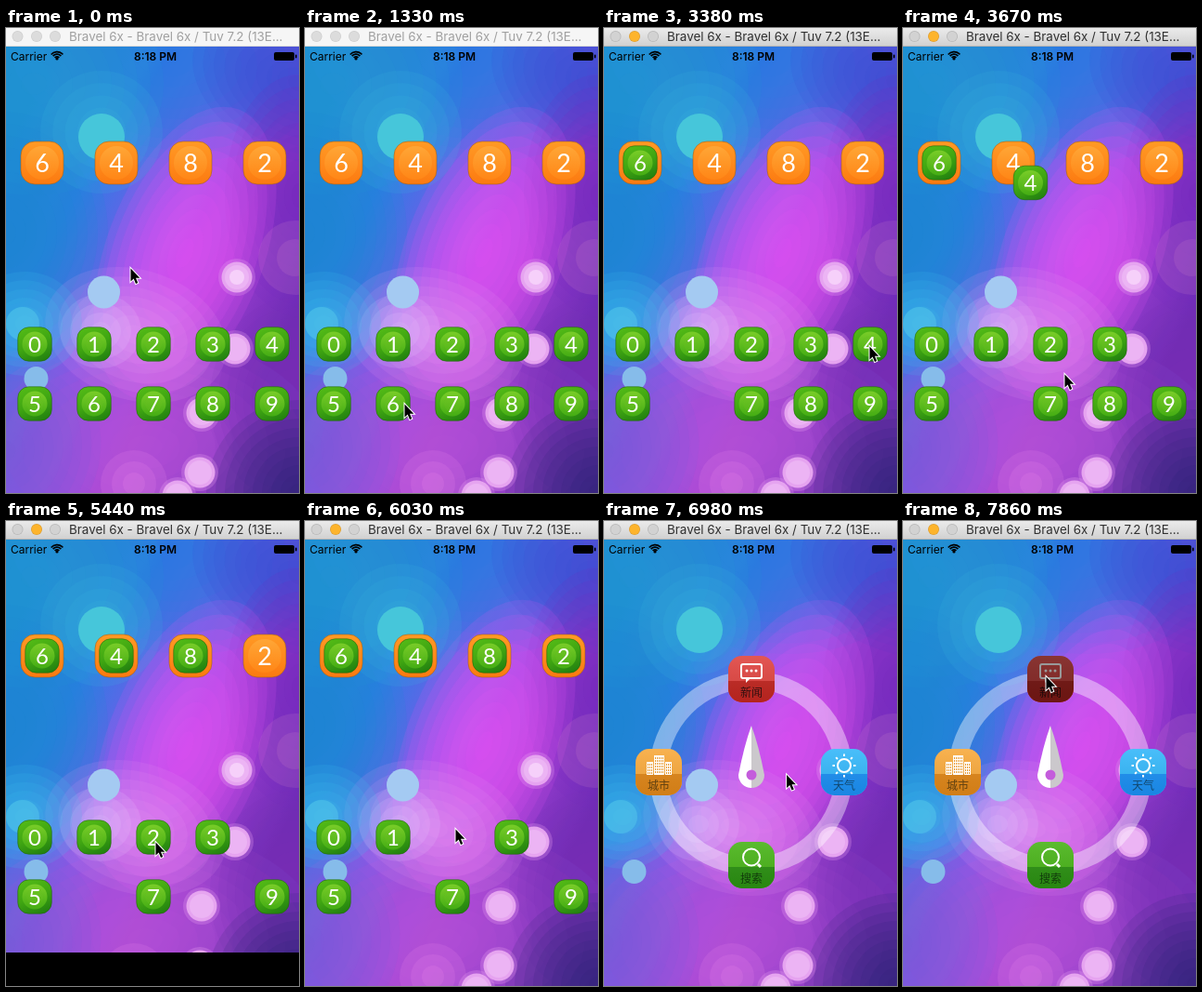
Write an HTML page with a canvas that moves like this. It is 316 by 500 pixels and loops after 8000 ms.

```html
<!DOCTYPE html>
<html lang="en">
<head>
<meta charset="utf-8">
<title>Number puzzle</title>
<style>
  html, body { margin: 0; width: 100%; height: 100%; overflow: hidden; background: #000; }
  canvas { display: block; }
</style>
</head>
<body>
<canvas id="stage" width="316" height="500"></canvas>
<script>
const W = 316, H = 500, LOOP = 8000, TICK = 147;
const TEAR = 6680, MENU = 6825, PRESS = 7850, ACTIVE = 2050;
const stage = document.getElementById('stage');
const screen = stage.getContext('2d');
let c = screen;

// ---------- drawing helpers ----------
function disc(x, y, r, fill) {
  c.fillStyle = fill;
  c.beginPath();
  c.arc(x, y, r, 0, 7);
  c.fill();
}

function poly(points, fill, stroke, width = 1) {
  c.beginPath();
  points.forEach(([x, y]) => c.lineTo(x, y));
  c.closePath();
  if (stroke) { c.strokeStyle = stroke; c.lineWidth = width; c.stroke(); }
  if (fill) { c.fillStyle = fill; c.fill(); }
}

function line(x1, y1, x2, y2) {
  c.beginPath();
  c.moveTo(x1, y1);
  c.lineTo(x2, y2);
  c.stroke();
}

function text(str, x, y, font, fill, align = 'center') {
  c.font = font;
  c.fillStyle = fill;
  c.textAlign = align;
  c.fillText(str, x, y);
}

function shade(x1, y1, x2, y2, ...colors) {
  const g = c.createLinearGradient(x1, y1, x2, y2);
  colors.forEach((col, i) => g.addColorStop(i / (colors.length - 1), col));
  return g;
}

function box(x, y, size, r) {
  c.beginPath();
  c.roundRect(x - size / 2, y - size / 2, size, size, r);
}

// ---------- wallpaper, painted once ----------
// Nested translucent ellipses give a stepped glow
function glow(x, y, rx, ry, turn, color, alpha = 0.15, steps = 10) {
  c.fillStyle = color;
  c.globalAlpha = alpha;
  for (let k = steps; k > 0; k--) {
    c.beginPath();
    c.ellipse(x, y, rx * k / steps, ry * k / steps, turn, 0, 7);
    c.fill();
  }
  c.globalAlpha = 1;
}

function paintWallpaper() {
  const layer = document.createElement('canvas');
  layer.width = W;
  layer.height = H;
  c = layer.getContext('2d');
  c.fillStyle = shade(0, 130, 316, 300, '#1f88d2', '#2d7ce4', '#7a5ae8', '#a040d4', '#6c2cb4');
  c.fillRect(0, 0, W, H);
  glow(170, 30, 170, 110, 0.2, '#2878de');
  glow(316, 60, 120, 80, 0.4, '#3a4ccc');
  glow(30, 60, 140, 120, 0, '#2692d2');
  glow(0, 220, 110, 130, 0, '#2086d2');
  glow(316, 180, 80, 130, 0, '#7428b8');
  glow(150, 450, 190, 120, 0, '#b652d6');
  glow(0, 455, 100, 110, 0.5, '#7058d4', 0.12);
  glow(310, 400, 90, 110, 0, '#7c32b4');
  glow(316, 500, 100, 100, 0, '#2c2670');
  glow(193, 242, 85, 165, 0.36, '#e355f0');
  glow(140, 330, 100, 70, 0.3, '#e29cf0', 0.13, 7);
  glow(102, 326, 44, 40, 0, '#e6d0fc', 0.15, 4);
  glow(20, 318, 62, 56, 0, '#40c0e6', 0.15, 6);
  glow(18, 318, 18, 18, 0, '#5cd2ea', 0.4, 1);
  glow(103, 112, 66, 66, 0, '#3cb8dc', 0.14, 5);
  disc(103, 117, 25, '#46c6da');
  glow(312, 247, 40, 40, 0, '#d898c8', 0.14, 2);
  glow(138, 490, 36, 36, 0, '#ff9cf0', 0.13, 3);
  disc(105.5, 284, 17.5, '#a4caf2');
  disc(32.5, 377, 13, '#86bcea');
  [[249, 268], [247, 345], [211, 414], [209, 478], [185, 503]].forEach(([x, y]) => {
    disc(x, y, 20, '#e8a0f045');
    disc(x, y, 16.5, '#e6a4f0');
    disc(x, y, 13, '#ecb4f4');
  });
  disc(249, 268, 8, '#f6d0fa');
  c = screen;
  return layer;
}
const wallpaper = paintWallpaper();

// ---------- number tiles ----------
const FIGURES = 'Lato, "Open Sans", sans-serif';

function slot(x, digit) {
  const y = 145;
  box(x, y, 46, 15);
  c.fillStyle = shade(0, 122, 0, 168, '#ff9a24', '#ff8a1c', '#fb7a10');
  c.fill();
  c.strokeStyle = '#a0601c90';
  c.lineWidth = 1;
  c.stroke();
  disc(x, y, 18, shade(0, 127, 0, 163, '#ffa636', '#ff8616'));
  text(digit, x, y + 10, '27px ' + FIGURES, '#fff');
}

function tile(x, y, digit) {
  box(x, y, 36.5, 12);
  c.fillStyle = shade(x - 8, y - 18, x + 8, y + 18, '#52b916', '#3fa512', '#238210');
  c.fill();
  c.strokeStyle = '#20640c90';
  c.lineWidth = 1;
  c.stroke();
  disc(x, y, 13.5, shade(0, y - 13, 0, y + 13, '#78cc28', '#45ad14'));
  disc(x, y, 9, '#68c02450');
  text(digit, x, y + 8.5, '24px ' + FIGURES, '#fff');
}

const CODE = [6, 4, 8, 2];
const STARTS = [2050, 3408, 4550, 5720];
const FLIGHT = 300;

function puzzle(t) {
  CODE.forEach((digit, i) => slot(39 + 80 * i, digit));
  for (let digit = 0; digit < 10; digit++) {
    const x = 31 + 64 * (digit % 5), y = digit < 5 ? 340 : 404;
    const order = CODE.indexOf(digit);
    const p = order < 0 ? 0 : Math.max(0, Math.min(1, (t - STARTS[order]) / FLIGHT));
    tile(x + (39 + 80 * order - x) * p, y + (145 - y) * p, digit);
  }
}

// ---------- compass menu ----------
function button(x, y, label, top, bottom, ink, icon, pressed) {
  c.save();
  c.translate(x, y);
  box(0, 0, 50, 15);
  c.clip();
  c.fillStyle = top;
  c.fillRect(-25, -25, 50, 50);
  c.fillStyle = bottom;
  c.fillRect(-25, 2, 50, 23);
  c.fillStyle = shade(0, -25, 0, 25, '#ffffff18', '#00000010');
  c.fillRect(-25, -25, 50, 50);
  c.strokeStyle = c.fillStyle = '#fff';
  c.lineWidth = 2;
  icon();
  text(label, 0, 18.5, '12px "Noto Sans CJK SC", "Noto Sans CJK", sans-serif', ink);
  if (pressed) {
    c.fillStyle = '#00000066';
    c.fillRect(-25, -25, 50, 50);
  }
  c.restore();
}

function bubble() {
  c.beginPath();
  c.roundRect(-11, -16, 22, 15, 2);
  c.stroke();
  poly([[-6, -1], [-1, -1], [-6, 4]], '#fff');
  [-5, 0, 5].forEach(x => disc(x, -9, 1.5, '#fff'));
}

function towers() {
  [[-13, -11, 7], [-5, -18, 11], [7, -11, 7]].forEach(([x, y, w]) => {
    c.fillStyle = '#fff';
    c.fillRect(x, y, w, 3 - y);
    c.fillStyle = '#e79a32';
    for (let wy = y + 2; wy < 2; wy += 3)
      for (let wx = x + 1; wx < x + w - 1; wx += 2) c.fillRect(wx, wy, 1, 2);
  });
}

function sun() {
  c.beginPath();
  c.arc(0, -7, 7, 0, 7);
  c.stroke();
  for (let i = 0; i < 8; i++) {
    const dx = Math.cos(i * Math.PI / 4), dy = Math.sin(i * Math.PI / 4);
    line(dx * 10, dy * 10 - 7, dx * 12.5, dy * 12.5 - 7);
  }
}

function lens() {
  c.beginPath();
  c.arc(0, -8.5, 9, 0, 7);
  c.stroke();
  c.lineWidth = 3;
  line(7, -1, 10, 2);
}

function menu(t) {
  c.strokeStyle = '#ffffff66';
  c.lineWidth = 19;
  c.beginPath();
  c.arc(158.5, 271, 100, 0, 7);
  c.stroke();

  button(159, 170, '新闻', '#e04642', '#c02620', '#301010', bubble, t >= PRESS);
  button(59, 270, '城市', '#f8aa3e', '#df8618', '#604010', towers);
  button(259, 270, '天气', '#36b8fa', '#1b8ff2', '#124870', sun);
  button(159, 370, '搜索', '#4ab41a', '#2b9012', '#123c0c', lens);

  for (const [side, fill] of [[-1, '#fff'], [1, '#cbc8cc']]) {
    c.fillStyle = fill;
    c.beginPath();
    c.moveTo(159, 220);
    c.quadraticCurveTo(159 + side * 8, 242, 159 + side * 14, 273);
    c.arc(159, 273, 14, side < 0 ? Math.PI : 0, Math.PI / 2, side < 0);
    c.closePath();
    c.fill();
  }
  disc(159, 273, 5.5, '#c45cdc');
}

// ---------- window chrome ----------
const UI = 'Inter, "Liberation Sans", sans-serif';

function titleBar(active) {
  c.fillStyle = active ? shade(0, 0, 0, 20, '#ebebeb', '#d0d0d0') : '#f6f6f6';
  c.fillRect(0, 0, W, 20);
  c.fillStyle = active ? '#b4b4b4' : '#d8d8d8';
  c.fillRect(0, 19, W, 1);
  [12.5, 33, 53].forEach((x, i) => {
    disc(x, 9, 6, active ? (i === 1 ? '#e0a030' : '#b8b8b8') : '#cfcfcf');
    disc(x, 9, 5.2, active ? (i === 1 ? '#fdb42c' : '#d2d2d2') : '#dcdcdc');
  });
  text('Bravel 6x - Bravel 6x / Tuv 7.2 (13E...', 68, 14, '13.4px ' + UI,
    active ? '#303030' : '#a0a0a0', 'left');
}

function statusBar() {
  text('Carrier', 5, 34.5, '12px ' + UI, '#000', 'left');
  text('8:18 PM', 161, 34.5, '600 12px ' + UI, '#000');
  c.strokeStyle = '#000';
  c.lineWidth = 1.7;
  [3.2, 5.8, 8.4].forEach(r => {
    c.beginPath();
    c.arc(55, 34, r, -Math.PI * 0.77, -Math.PI * 0.23);
    c.stroke();
  });
  disc(55, 33, 1.6, '#000');
  c.beginPath();
  c.roundRect(289, 26, 22, 9, 2);
  c.roundRect(312, 28.5, 1.6, 4, 1);
  c.fill();
}

// ---------- pointer ----------
const PATH = [
  [0, 134, 258], [441, 97, 341], [735, 97, 341], [1029, 86, 378], [1323, 107, 404],
  [1911, 107, 404], [2499, 121, 362], [3087, 286, 342], [3381, 286, 342],
  [3675, 174, 372], [4410, 222, 404], [4557, 222, 404], [5439, 161, 345],
  [5586, 162, 344], [6027, 162, 331], [6680, 162, 331], [7709, 283, 126], [7856, 154, 167]
];

function pointer(t) {
  const i = PATH.findIndex(k => k[0] > t);
  const b = PATH[i < 0 ? PATH.length - 1 : i];
  const a = i < 0 ? b : PATH[i - 1];
  const p = a === b ? 0 : (t - a[0]) / (b[0] - a[0]);
  c.save();
  c.translate(a[1] + (b[1] - a[1]) * p, a[2] + (b[2] - a[2]) * p);
  poly([[0.5, 0.5], [0.5, 14.5], [3.7, 11.6], [6, 17], [8.2, 16], [6, 10.8], [10.3, 10.8]],
    '#000', '#fff', 2);
  c.restore();
}

function held(t) {
  return t < TEAR
    ? Math.floor((t + 10) / TICK) * TICK
    : TEAR + Math.floor((t - TEAR + 3) / TICK) * TICK;
}

function draw(now) {
  const t = held(now % LOOP);
  c.drawImage(wallpaper, 0, 0);
  if (t >= MENU) menu(t);
  else puzzle(t);
  statusBar();
  if (t >= 5430 && t < 5580) {
    c.fillStyle = '#000';
    c.fillRect(0, 464, W, 36);
  }
  if (t >= TEAR && t < MENU)
    poly([[0, 20], [W, 20], [W, 181], [107, 181], [308, 482], [0, 482]], '#000');
  titleBar(t >= ACTIVE);
  pointer(t);
}

const begin = performance.now();
function loop() {
  draw(performance.now() - begin);
  requestAnimationFrame(loop);
}
loop();
</script>
</body>
</html>
```
